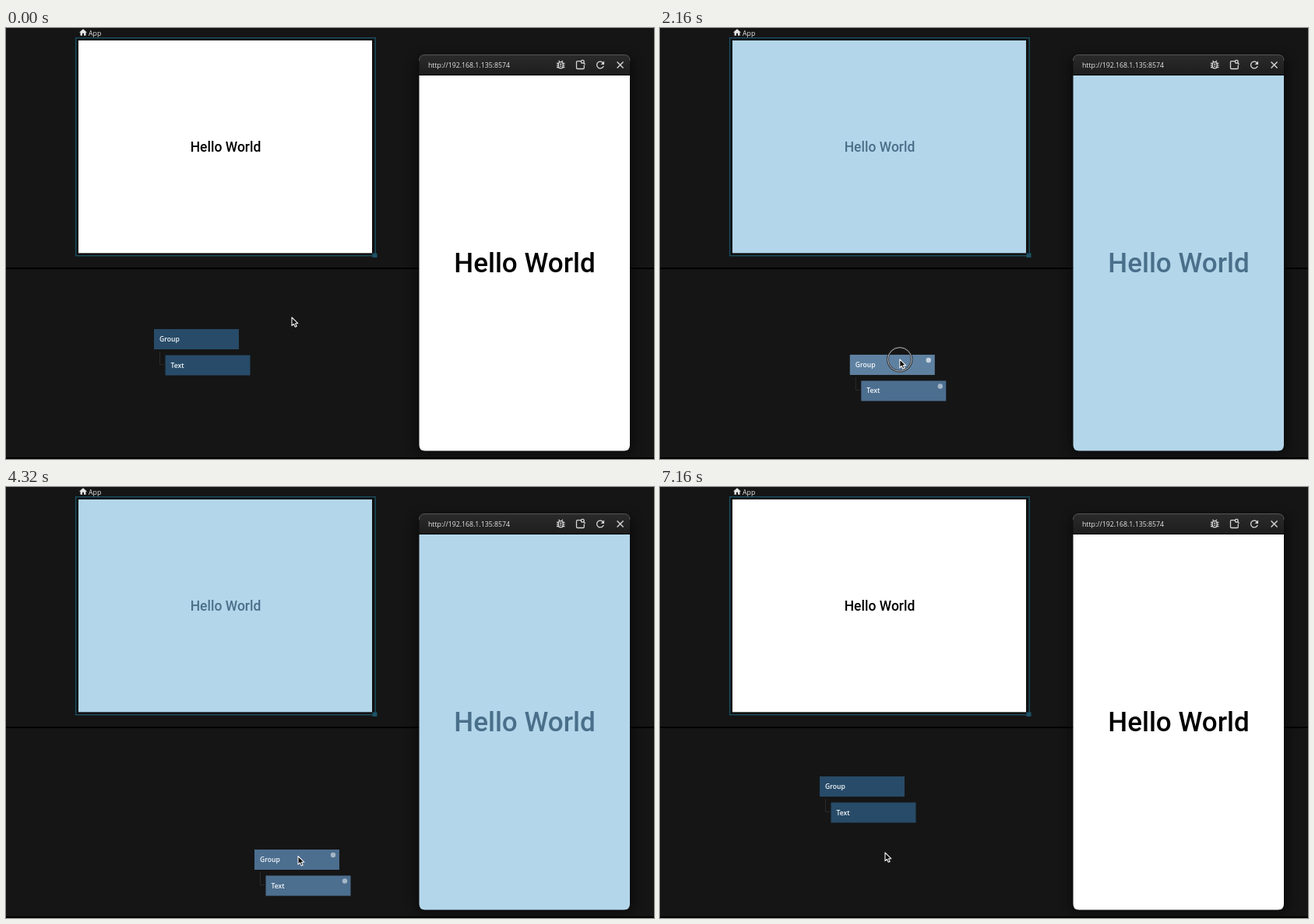
An HTML page that plays this animation: 832x554 px, repeating every 7.2 s.

```html
<!DOCTYPE html>
<html lang="en">
<head>
<meta charset="utf-8">
<title>Node editor</title>
<style>
  html, body { margin: 0; width: 100%; height: 100%; overflow: hidden; background: #151515; }
  svg { display: block; width: 832px; height: 554px; }
  text { font-family: "Open Sans", sans-serif; font-size: 8.75px; fill: #e6e6e6; }
  .hello { font-family: Roboto, sans-serif; font-weight: 500; text-anchor: middle; fill: #000; }
  .page { fill: #fff; }
  .hover .hello { fill: #4a6f8a; }
  .hover .page { fill: #b3d6ea; }
  .icon { fill: none; stroke: #d6d6d6; stroke-width: 1.3; }
  .node text { font-size: 8.6px; font-weight: 600; fill: #f4f7fa; }
</style>
</head>
<body>
<svg id="stage" viewBox="0 0 832 554">
  <defs>
    <filter id="shadow" x="-20%" y="-20%" width="140%" height="140%">
      <feGaussianBlur stdDeviation="8"/>
    </filter>
    <linearGradient id="bar" x2="0" y2="1">
      <stop stop-color="#2b2b2b"/><stop offset="1" stop-color="#1c1c1c"/>
    </linearGradient>
  </defs>
  <rect width="832" height="554" fill="#151515"/>
  <path d="M0 309H832M0 553H832" stroke="#000" stroke-width="2"/>

  <!-- canvas preview -->
  <path transform="translate(93 -.2) scale(.5)" d="M10 20v-6h4v6h5v-8h3L12 3 2 12h3v8z" fill="#e6e6e6"/>
  <text x="106" y="10">App</text>
  <rect x="89.6" y="12.7" width="384.6" height="280" fill="#111" stroke="#1a4f61" stroke-width="1.4"/>
  <rect class="page" x="93" y="16" width="377" height="273.300"/>
  <rect x="470.5" y="289.5" width="6" height="5.5" fill="#1d5266"/>
  <text class="hello" x="282" y="158.800" style="font-size:17.5px">Hello World</text>

  <!-- device preview -->
  <rect x="528" y="38" width="276" height="508" rx="8" fill="#000" opacity=".55" filter="url(#shadow)"/>
  <path d="M530.5 62V42q0-7.500 7.500-7.500H793.500q7.500 0 7.500 7.500V62z" fill="url(#bar)"/>
  <path d="M530.5 42q0-7.500 7.500-7.500H793.500q7.500 0 7.500 7.500" fill="none" stroke="#565656"/>
  <path d="M530.5 60.500H801" stroke="#000"/>
  <path class="page" d="M530.5 61H801V536q0 7.500-7.500 7.500H538q-7.500 0-7.500-7.500z"/>
  <text x="542" y="50.700">http://192.168.1.135:8574</text>
  <g class="icon">
    <rect x="709.3" y="43.7" width="5.800" height="8.200" rx="2.900"/>
    <path d="M707 45.300h2.600M707 47.900h2.300M707 50.500h2.600M714.800 45.300h2.600M715.100 47.900h2.300M714.800 50.500h2.600M709.600 42l1.500 1.600M714.800 42l-1.500 1.600M711 46.500h2.400M711 49.200h2.400"/>
    <path d="M738 42.700h-4.200q-1.300 0-1.300 1.300v7.200q0 1.300 1.300 1.300h7.200q1.300 0 1.300-1.300V47.500"/>
    <circle cx="740.300" cy="43.300" r="1.900"/>
    <path d="M741.600 44.700l2 2"/>
    <path d="M784.600 43.500l8 8M792.600 43.500l-8 8" stroke-width="1.400"/>
  </g>
  <path transform="translate(755.5 40) scale(.63)" fill="#d6d6d6" d="M17.650 6.350C16.200 4.900 14.210 4 12 4c-4.420 0-7.990 3.580-7.990 8s3.570 8 7.990 8c3.730 0 6.840-2.550 7.730-6h-2.080c-.820 2.330-3.040 4-5.650 4-3.310 0-6-2.690-6-6s2.690-6 6-6c1.660 0 3.140.690 4.220 1.780L13 11h7V4z"/>
  <text class="hello" x="666" y="314.300" style="font-size:35px">Hello World</text>

  <!-- node tree -->
  <g id="tree">
    <path d="M7.500 29V45.500H13" fill="none" stroke="#2b2b2b"/>
    <g class="node">
      <rect id="groupBox" width="109" height="26"/>
      <rect id="border" x="-.2" y="-.2" width="109.400" height="26.400" fill="none" stroke="#fff" stroke-width="1.700"/>
      <text x="7" y="16">Group</text>
      <circle id="groupDot" cx="101" cy="7" r="3.200" fill="#fff"/>
    </g>
    <g class="node" transform="translate(14.500 33.500)">
      <rect id="textBox" width="109" height="26"/>
      <text x="7" y="16">Text</text>
      <circle id="textDot" cx="101.500" cy="7" r="3.200" fill="#fff"/>
    </g>
  </g>

  <g id="cursor">
    <g id="ring" fill="none">
      <circle r="15.300" stroke="#222" stroke-width="3" stroke-opacity=".7"/>
      <circle r="15.300" stroke="#b4b4b4"/>
    </g>
    <path d="M0 0V10.700L2.500 8.400 4.200 12.300 6.200 11.400 4.500 7.700H7.800z" fill="#0b0b0b" stroke="#f4f4f4" stroke-width="1.100" stroke-linejoin="round"/>
  </g>
</svg>
<script>
const LOOP = 7200, STEP = 40;
const DARK = [39, 75, 104], LIT = [76, 110, 143], BRIGHT = [95, 129, 161];
const $ = id => document.getElementById(id);

const clamp = v => Math.max(0, Math.min(1, v));
const phase = (t, a, b) => clamp((t - a) / (b - a));
const mix = (a, b, k) => a.map((v, i) => v + (b[i] - v) * k);
const rgb = c => `rgb(${c.map(Math.round)})`;
const smooth = u => u * u * (3 - 2 * u);
const outBack = u => 1 + 3.6 * (u - 1) ** 3 + 2.6 * (u - 1) ** 2;
const outSoft = u => 1 - (1 - u) ** 1.7;

// Each gesture: hover the group, drag it, drop it, move away, lights go out
const gestures = [
  { enter: 1560, grab: 1840, drop: 2560, free: 2840, leave: 2920, dim: 3240,
    from: [190, 387], to: [319, 466], grip: [64, 6], ease: [smooth, smooth] },
  { enter: 4040, grab: 4320, drop: 5160, free: 5440, leave: 5520, dim: 6000,
    from: [319, 466], to: [205, 372], grip: [56, 8.5], ease: [outBack, outSoft] }
];

// Free cursor moves: a glide plus a circling sway that fades at both ends
const moves = [
  { a: 0, b: 1600, from: [367, 372], to: [254, 393], sway: [150, 85], turns: 2 },
  { a: 2800, b: 2880, from: [383, 472], to: [374, 446] },
  { a: 2880, b: 4240, from: [374, 446], to: [375, 474.5], sway: [40, -50], turns: 1 },
  { a: 5400, b: 5560, from: [261, 380.5], to: [384, 405] },
  { a: 5680, b: 6920, from: [384, 405], to: [289, 470], sway: [80, 25], turns: .5 }
];

function glide({ a, b, from, to, sway = [0, 0], turns = 0 }, t) {
  const u = phase(t, a, b), angle = 2 * Math.PI * turns * u, fade = Math.sin(Math.PI * u);
  const [x, y] = mix(from, to, smooth(u));
  return [x + fade * sway[0] * Math.cos(angle), y + fade * sway[1] * Math.sin(angle)];
}

const show = (id, on) => $(id).setAttribute("visibility", on ? "visible" : "hidden");
const move = (id, [x, y]) => $(id).setAttribute("transform", `translate(${x} ${y})`);

function draw(t) {
  const g = t < gestures[0].dim ? gestures[0] : gestures[1];
  const u = phase(t, g.grab, g.drop);
  const tree = g.from.map((v, i) => v + (g.to[i] - v) * g.ease[i](u));
  const dragging = t > g.grab && t <= g.drop;
  const hover = t >= g.enter && t < g.leave;
  const border = hover && (t < g.grab || t >= g.free);
  const lit = phase(t, g.enter - STEP, g.enter) * (1 - phase(t, g.dim - 200, g.dim));
  const bright = dragging ? 1 : t > g.drop ? 1 - phase(t, g.drop, g.drop + 2 * STEP) : 0;
  const base = mix(DARK, LIT, lit);

  move("tree", tree);
  move("cursor", dragging
    ? tree.map((v, i) => v + g.grip[i])
    : glide(moves.findLast(m => t >= m.a), t > g.drop && t < g.free - STEP ? g.drop : t));
  if (t > g.drop && t < g.free - STEP) move("cursor", g.to.map((v, i) => v + g.grip[i]));
  $("groupBox").setAttribute("fill", rgb(mix(base, BRIGHT, bright)));
  $("textBox").setAttribute("fill", rgb(base));
  $("groupDot").setAttribute("opacity", border ? 1 : lit * (.5 + .15 * bright));
  $("textDot").setAttribute("opacity", lit * .5);
  show("border", border);
  show("ring", dragging);
  $("stage").classList.toggle("hover", hover && t >= g.enter + 120);
}

function tick() {
  draw(Math.floor(performance.now() % LOOP / STEP) * STEP);
  requestAnimationFrame(tick);
}
tick();
</script>
</body>
</html>
```
